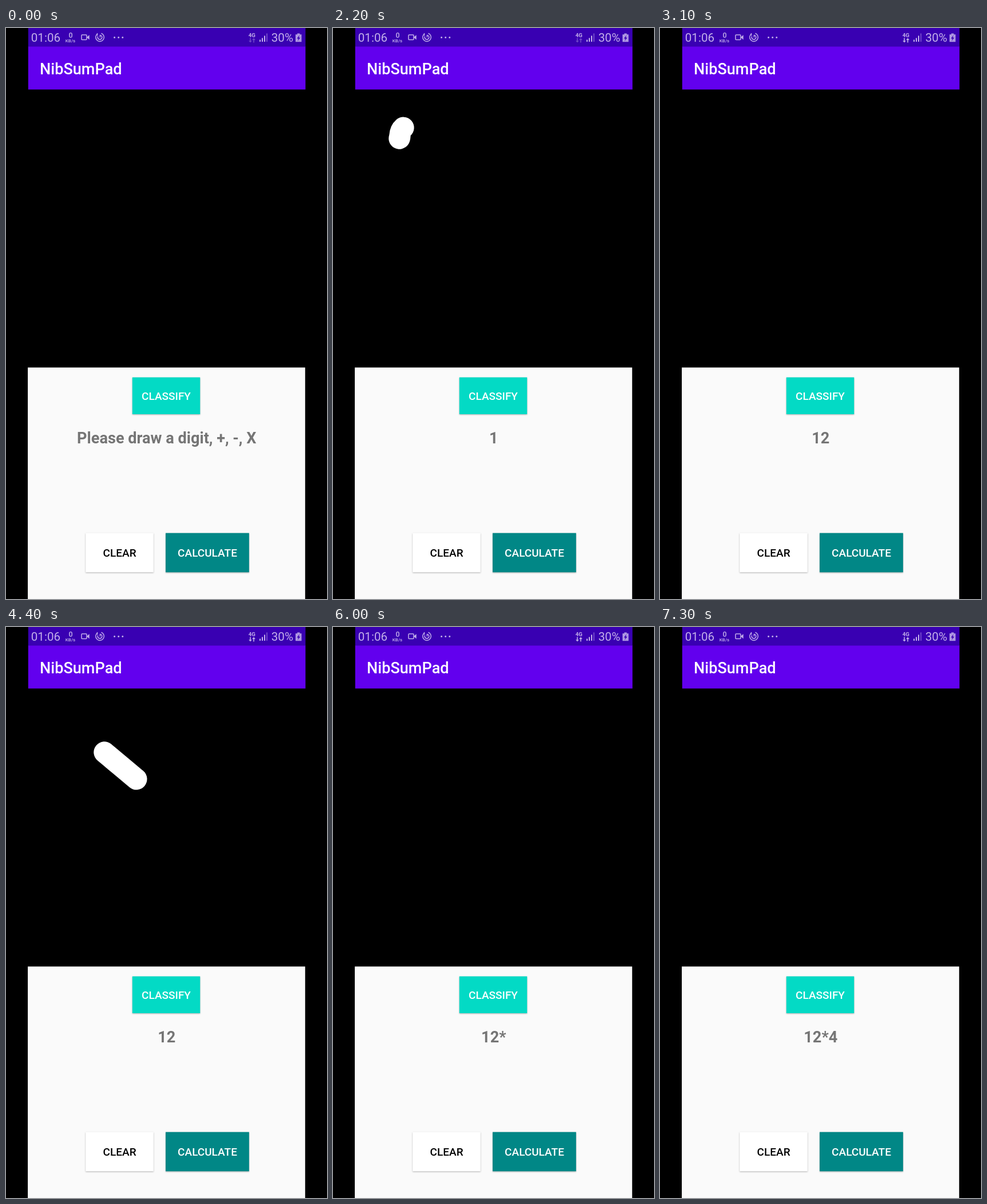
Write an HTML page that moves like this. It is 561x998 px and loops after 8000 ms.

```html
<!DOCTYPE html>
<html lang="en">
<head>
<meta charset="utf-8">
<title>Handwriting calculator</title>
<style>
html, body { margin: 0; width: 100%; height: 100%; overflow: hidden; background: #000; }
svg { display: block; width: 561px; height: 998px; font-family: Roboto, sans-serif; }
.btn { filter: drop-shadow(0 1.6px 1.3px rgba(0, 0, 0, .3)); }
.label { font-size: 19px; font-weight: 500; text-anchor: middle; }
.ink { fill: none; stroke: #fff; stroke-width: 37.4; stroke-linecap: round; stroke-linejoin: round; }
.line { fill: none; stroke: #c3b0ea; stroke-width: 1.5; }
</style>
</head>
<body>
<svg viewBox="0 0 561 998">
  <rect width="561" height="998" fill="#000"/>
  <rect x="38.8" width="484.6" height="33" fill="#3900b2"/>
  <rect x="38.8" y="32.5" width="484.6" height="75" fill="#6200ee"/>

  <g fill="#c3b0ea">
    <text x="43.8" y="23.8" font-size="20.6">01:06</text>
    <text x="113" y="17" font-size="12.5" font-weight="500" text-anchor="middle">0</text>
    <text x="112.5" y="25.3" font-size="8" font-weight="500" text-anchor="middle">KB/s</text>
    <rect class="line" x="132" y="12" width="9" height="8.6" rx="1"/>
    <path d="M141 16.3 L145.6 12.3 V20.5 Z"/>
    <path class="line" d="M160 10 A7.3 7.3 0 1 0 166.5 9.2 M160.6 14.6 A3.8 3.8 0 1 0 165 12.6 M159.5 9 V13.5 M164.5 12 V16.5"/>
    <path class="line" d="M189.6 16.4 h14.3" style="stroke-width:3; stroke-linecap:round; stroke-dasharray:0 7.1"/>
    <text x="429.7" y="15.8" font-size="9.6" font-weight="700" text-anchor="middle">4G</text>
    <path id="arrows" d="M426.2 17.6 h1.6 v4.6 h2 l-2.8 3.4 l-2.8 -3.4 h2 Z M432.2 25.6 h1.6 v-4.6 h2 l-2.8 -3.4 l-2.8 3.4 h2 Z"/>
    <path d="M443 20.5 h2 v3.5 h-2 Z M447 17.5 h2 v6.5 h-2 Z M451 13.5 h2 v10.5 h-2 Z"/>
    <rect x="455" y="9.5" width="2" height="14.5" opacity=".4"/>
    <text x="463.8" y="23.8" font-size="20.6">30%</text>
    <path d="M509 9.5 h4.5 v1.8 h3 v13 h-10.5 v-13 h3 Z" opacity=".85"/>
    <path d="M512.8 12.6 L508.4 18.4 H511 L509.8 22.8 L514.3 16.8 H511.7 Z" fill="#3900b2"/>
  </g>
  <text x="59" y="81" font-size="27.1" font-weight="500" fill="#fff">NibSumPad</text>

  <g id="board"></g>

  <rect x="38.1" y="593.4" width="484.7" height="405" fill="#fafafa"/>
  <rect class="btn" x="220.8" y="610.6" width="118.4" height="64.4" fill="#03dac5"/>
  <text class="label" x="280" y="650.2" fill="#fff">CLASSIFY</text>
  <text id="result" x="280.8" y="725.8" font-size="27.1" font-weight="700" fill="#757575" text-anchor="middle"></text>
  <rect class="btn" x="139.2" y="882.7" width="118.6" height="68.6" fill="#fff"/>
  <text class="label" x="198.6" y="924.1" fill="#000">CLEAR</text>
  <rect class="btn" x="279" y="882.7" width="145.8" height="68.6" fill="#018786"/>
  <text class="label" x="352" y="924.1" fill="#fff">CALCULATE</text>
</svg>
<script>
const LOOP = 8000, STEP = 100;
const $ = id => document.getElementById(id);

// Each symbol: pen strokes as [first ms, last ms, key points], then the board clears and the result shows.
// A repeated key point makes a corner.
const symbols = [
  { clear: 1500, result: "1", strokes: [
    [200, 700, "193,198 212,186 278,141 278,141 275,255 265,380 258,486"],
    [800, 1200, "167,502 250,475 335,462 466,456"]] },
  { clear: 3100, result: "12", strokes: [
    [2200, 2800, "116,193 130,170 215,150 274,205 160,400 92,490 140,511 411,488"]] },
  { clear: 5400, result: "12*", strokes: [
    [4400, 4600, "172,219 250,285 305,337 380,420 414,452 418,461"],
    [4800, 4900, "406,219 357,271 305,337 222,456 184,512 177,522"]] },
  { clear: 7300, result: "12*4", strokes: [
    [6200, 6500, "281,145 240,197 135,297 98,345 160,362 262,366 356,353 354,348"],
    [6600, 6900, "262,262 242,538"]] }
];
const dataOn = [[2900, 3900], [4400, 4500], [6000, LOOP]];

// Catmull-Rom curve through the key points
function curve(text) {
  const p = text.split(" ").map(s => s.split(",").map(Number));
  const at = i => p[Math.max(0, Math.min(p.length - 1, i))];
  const handle = (i, dir) => at(i).map((v, k) => v + dir * (at(i + 1)[k] - at(i - 1)[k]) / 6);
  let d = "M" + p[0];
  for (let i = 0; i < p.length - 1; i++) {
    if (String(p[i]) !== String(p[i + 1])) d += `C${handle(i, 1)} ${handle(i + 1, -1)} ${p[i + 1]}`;
  }
  return d;
}

const strokes = symbols.flatMap(({ clear, strokes }) => strokes.map(([from, to, points]) => {
  const el = document.createElementNS("http://www.w3.org/2000/svg", "path");
  el.setAttribute("class", "ink");
  el.setAttribute("d", curve(points));
  $("board").append(el);
  return { el, from, to, clear, len: el.getTotalLength() };
}));

// The pen speeds up, then slows down
const ease = x => x * x * x * (x * (6 * x - 15) + 10);

function render(ms) {
  const t = Math.floor(ms % LOOP / STEP) * STEP;
  for (const { el, from, to, clear, len } of strokes) {
    const drawn = len * ease(Math.max(0, Math.min(1, (t - from + STEP) / (to - from + STEP))));
    el.style.display = t >= from && t < clear ? "" : "none";
    el.style.strokeDasharray = t < to ? `${drawn} ${2 * len}` : "none";
  }
  const done = symbols.filter(s => s.clear <= t).pop();
  $("result").textContent = done ? done.result : "Please draw a digit, +, -, X";
  $("arrows").style.opacity = dataOn.some(([a, b]) => t >= a && t < b) ? 1 : .4;
}

let start;
function tick(now) {
  start ??= now;
  render(now - start);
  requestAnimationFrame(tick);
}
render(0);
requestAnimationFrame(tick);
</script>
</body>
</html>
```
